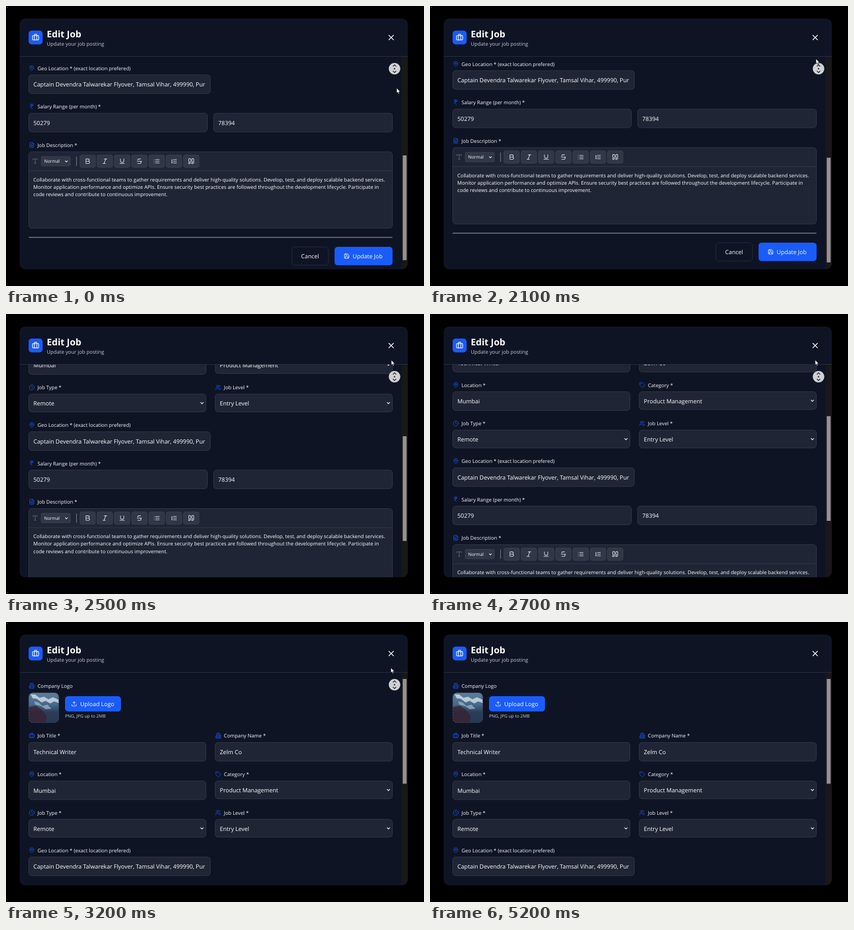
These frames come from a looping animation (800x536 px, 5300 ms). An HTML page:

```html
<!DOCTYPE html>
<html lang="en">
<head>
<meta charset="utf-8">
<title>Edit Job</title>
<style>
  html, body { margin: 0; width: 100%; height: 100%; overflow: hidden; background: #000; }
  svg { display: block; }
  text {
    font-family: "Open Sans", "Noto Sans", sans-serif; font-size: 11.05px;
    fill: #fff; white-space: pre; text-rendering: geometricPrecision;
  }
  .small { font-size: 9.64px; }
  .label { font-size: 9.64px; fill: #f8f9fb; }
  .title { font-size: 17.5px; font-weight: 700; }
  .sub { font-size: 9.75px; fill: #c6cad2; }
  .hint { font-size: 8.4px; fill: #ced2da; }
  .size { font-size: 8.5px; }
  .field { fill: #202536; stroke: #3a404f; stroke-width: .8; }
  .tool { fill: #313747; stroke: #434958; stroke-width: .7; }
  .blue { fill: #1a5cfa; }
  .line { fill: none; stroke-width: 2; stroke-linecap: round; stroke-linejoin: round; }
</style>
</head>
<body>
<svg width="800" height="536" viewBox="0 0 800 536">
  <defs>
    <symbol id="briefcase" viewBox="0 0 24 24"><path d="M16 20V4a2 2 0 0 0-2-2h-4a2 2 0 0 0-2 2v16"/><rect x="2" y="6" width="20" height="14" rx="2"/></symbol>
    <symbol id="building" viewBox="0 0 24 24"><path d="M6 22V4a2 2 0 0 1 2-2h8a2 2 0 0 1 2 2v18ZM6 12H4a2 2 0 0 0-2 2v6a2 2 0 0 0 2 2h2M18 9h2a2 2 0 0 1 2 2v9a2 2 0 0 1-2 2h-2M10 6h4M10 10h4M10 14h4M10 18h4"/></symbol>
    <symbol id="pin" viewBox="0 0 24 24"><path d="M20 10c0 5-5.5 10.2-7.4 11.8a1 1 0 0 1-1.2 0C9.5 20.2 4 15 4 10a8 8 0 0 1 16 0"/><circle cx="12" cy="10" r="3"/></symbol>
    <symbol id="tag" viewBox="0 0 24 24"><path d="M12.6 2.6A2 2 0 0 0 11.2 2H4a2 2 0 0 0-2 2v7.2a2 2 0 0 0 .6 1.4l8.7 8.7a2.4 2.4 0 0 0 3.4 0l6.6-6.6a2.4 2.4 0 0 0 0-3.4z"/><circle cx="7.5" cy="7.5" r=".5"/></symbol>
    <symbol id="clock" viewBox="0 0 24 24"><circle cx="12" cy="12" r="10"/><path d="M12 6v6l4 2"/></symbol>
    <symbol id="users" viewBox="0 0 24 24"><path d="M16 21v-2a4 4 0 0 0-4-4H6a4 4 0 0 0-4 4v2M22 21v-2a4 4 0 0 0-3-3.87M16 3.13a4 4 0 0 1 0 7.75"/><circle cx="9" cy="7" r="4"/></symbol>
    <symbol id="rupee" viewBox="0 0 24 24"><path d="M6 3h12M6 8h12M6 13l8.5 8M6 13h3c6.67 0 6.67-10 0-10"/></symbol>
    <symbol id="file" viewBox="0 0 24 24"><path d="M15 2H6a2 2 0 0 0-2 2v16a2 2 0 0 0 2 2h12a2 2 0 0 0 2-2V7ZM14 2v4a2 2 0 0 0 2 2h4M10 9H8M16 13H8M16 17H8"/></symbol>
    <symbol id="upload" viewBox="0 0 24 24"><path d="M21 15v4a2 2 0 0 1-2 2H5a2 2 0 0 1-2-2v-4M17 8l-5-5-5 5M12 3v12"/></symbol>
    <symbol id="save" viewBox="0 0 24 24"><path d="M15.2 3a2 2 0 0 1 1.4.6l3.8 3.8a2 2 0 0 1 .6 1.4V19a2 2 0 0 1-2 2H5a2 2 0 0 1-2-2V5a2 2 0 0 1 2-2zM17 21v-7a1 1 0 0 0-1-1H8a1 1 0 0 0-1 1v7M7 3v4a1 1 0 0 0 1 1h7"/></symbol>
    <symbol id="type" viewBox="0 0 24 24"><path d="M4 7V4h16v3M9 20h6M12 4v16"/></symbol>
    <symbol id="bold" viewBox="0 0 24 24"><path d="M6 12h9a4 4 0 0 1 0 8H7a1 1 0 0 1-1-1V5a1 1 0 0 1 1-1h7a4 4 0 0 1 0 8"/></symbol>
    <symbol id="italic" viewBox="0 0 24 24"><path d="M19 4h-9M14 20H5M15 4L9 20"/></symbol>
    <symbol id="underline" viewBox="0 0 24 24"><path d="M6 4v6a6 6 0 0 0 12 0V4M4 20h16"/></symbol>
    <symbol id="strike" viewBox="0 0 24 24"><path d="M16 4H9a3 3 0 0 0-2.83 4M14 12a4 4 0 0 1 0 8H6M4 12h16"/></symbol>
    <symbol id="bullets" viewBox="0 0 24 24"><path d="M3 12h.01M3 18h.01M3 6h.01M8 12h13M8 18h13M8 6h13"/></symbol>
    <symbol id="numbers" viewBox="0 0 24 24"><path d="M10 12h11M10 18h11M10 6h11M4 10h2M4 6h1v4M6 18H4c0-1 2-2 2-3s-1-1.5-2-1"/></symbol>
    <symbol id="quote" viewBox="0 0 24 24"><path id="mark" d="M16 3a2 2 0 0 0-2 2v6a2 2 0 0 0 2 2 1 1 0 0 1 1 1v1a2 2 0 0 1-2 2 1 1 0 0 0-1 1v2a1 1 0 0 0 1 1 6 6 0 0 0 6-6V5a2 2 0 0 0-2-2z"/><use href="#mark" x="-11"/></symbol>
    <linearGradient id="sky" x2="0" y2="1">
      <stop offset="0" stop-color="#5f7f9a"/><stop offset=".4" stop-color="#47698a"/>
      <stop offset=".65" stop-color="#2c3c58"/><stop offset="1" stop-color="#263a52"/>
    </linearGradient>
    <clipPath id="card"><rect x="26" y="24" width="743" height="480" rx="11.4"/></clipPath>
    <clipPath id="body"><rect x="26" y="97" width="731" height="407"/></clipPath>
    <clipPath id="photo"><rect x="43.5" y="135.5" width="57.5" height="57" rx="8"/></clipPath>
    <clipPath id="geo"><rect x="52" y="449" width="330" height="37"/></clipPath>
  </defs>

  <g clip-path="url(#card)">
    <rect x="26" y="24" width="743" height="480" fill="#0f1425"/>
    <g clip-path="url(#body)"><g id="form"></g></g>
    <rect x="757" y="97" width="12" height="407" fill="#181818"/>
    <rect id="thumb" x="759.3" y="109" width="7.4" height="200.5" fill="#969294"/>
    <rect x="26" y="96" width="743" height="1" fill="#2b3140"/>
  </g>

  <rect class="blue" x="43.3" y="47" width="26.7" height="26.5" rx="5.7"/>
  <use class="line" href="#briefcase" x="49.5" y="53" width="14.3" height="14.3" stroke="#fff"/>
  <text class="title" x="78" y="60">Edit Job</text>
  <text class="sub" x="78" y="75.9">Update your job posting</text>
  <path d="M732.8 56l8.8 8.8m0-8.8l-8.8 8.8" fill="none" stroke="#fff" stroke-width="1.5" stroke-linecap="round"/>

  <g id="scroller">
    <circle cx="743.6" cy="120" r="11" fill="#d0d0d4"/>
    <path d="M740.4 115.8l3.2-3.2 3.2 3.2m-6.4 8.4l3.2 3.2 3.2-3.2" fill="none" stroke="#33353c" stroke-width="1.6"/>
    <circle cx="743.6" cy="120" r="1.5" fill="#33353c"/>
  </g>
  <path id="cursor" d="M0 0v9.8l2.2-2 1.5 3.5 1.7-.7-1.5-3.4h3z" fill="#fff" stroke="#000" stroke-width=".7"/>
</svg>
<script>
const $ = id => document.getElementById(id);

const icon = (name, x, y, size, color) =>
  `<use class="line" href="#${name}" x="${x - size / 2}" y="${y - size / 2}" width="${size}" height="${size}" stroke="${color}"/>`;
const text = (s, x, y, cls = '') => `<text class="${cls}" x="${x}" y="${y}">${s}</text>`;
const rect = (cls, x, y, w, h, r = 5.7) =>
  `<rect class="${cls}" x="${x}" y="${y}" width="${w}" height="${h}" rx="${r}"/>`;
const chevron = (x, y, r = 2.8) =>
  `<path d="M${x - r} ${y - r / 2}l${r} ${r} ${r} ${-r}" fill="none" stroke="#eceef2" stroke-width="1.3"/>`;
const label = (name, s, x, y) => icon(name, x + 5.8, y, 11.4, '#1a58ee') + text(s, x + 16.8, y + 3.8, 'label');
const input = (s, x, y, w) => rect('field', x, y, w, 35.8) + text(s, x + 9, y + 22.6);
const select = (s, x, y, w) =>
  rect('field', x, y, w, 34.2) + text(s, x + 9, y + 21.9) + chevron(x + w - 7.6, y + 17.2);

const left = 43.5, right = 400.3, half = 339.2;
const tools = ['bold', 'italic', 'underline', 'strike', 'bullets', 'numbers', 'quote'];
const lines = [
  'Collaborate with cross-functional teams to gather requirements and deliver high-quality solutions. Develop, test, and deploy scalable backend services.',
  'Monitor application performance and optimize APIs. Ensure security best practices are followed throughout the development lifecycle. Participate in',
  'code reviews and contribute to continuous improvement.'
];

const photo = `<g clip-path="url(#photo)">
  <rect x="43" y="135" width="59" height="58" fill="url(#sky)"/>
  <path d="M43 163l14-3 12 8 9 13-3 12H43z" fill="#38202f" opacity=".75"/>
  <path d="M47 138l9 1 8 6 9-2 8 5 9-4 11 5v6l-9-3-7 4-9-5-8 3-9-7-8-1z" fill="#dbe6ee" opacity=".75"/>
  <path d="M54 152l8 2 8 7 9-3 8 8-11 1-9-6-11-3z" fill="#b4c9d9" opacity=".6"/>
</g><rect x="43.7" y="135.7" width="57.2" height="56.8" rx="8" fill="none" stroke="#465063" stroke-dasharray="3 2"/>`;

$('form').innerHTML = [
  label('building', 'Company Logo', left, 122),
  photo,
  rect('blue', 113, 142, 107, 29.2),
  icon('upload', 130.3, 156.6, 11.4, '#fff'),
  text('Upload Logo', 142, 161.2),
  text('PNG, JPG up to 2MB', 113, 183.2, 'hint'),

  label('briefcase', 'Job Title *', left, 217.5),
  input('Technical Writer', left, 230.6, half),
  label('building', 'Company Name *', right, 217.5),
  input('Zelm Co', right, 230.6, half),

  label('pin', 'Location *', left, 291.4),
  input('Mumbai', left, 304.2, half),
  label('tag', 'Category *', right, 291.4),
  select('Product Management', right, 304.2, half),

  label('clock', 'Job Type *', left, 365),
  select('Remote', left, 377.7, half),
  label('users', 'Job Level *', right, 365),
  select('Entry Level', right, 377.7, half),

  label('pin', 'Geo Location * (exact location prefered)', left, 437),
  rect('field', left, 449.8, 347.6, 35.8),
  `<g clip-path="url(#geo)">${text('Captain Devendra Talwarekar Flyover, Tamsal Vihar, 499990, Pur', left + 9, 472.4)}</g>`,

  label('rupee', 'Salary Range (per month) *', left, 510.4),
  input('50279', left, 523.2, 342),
  input('78394', 397.3, 523.2, 342.2),

  label('file', 'Job Description *', left, 584),
  rect('field', left, 597, 696, 146.3),
  '<path d="M43.5 633.5h696" stroke="#3a404f" stroke-width=".8"/>',
  icon('type', 55.8, 615, 12.9, '#636a78'),
  rect('tool', 67.4, 606, 55.8, 18.3, 2.5),
  text('Normal', 73, 618.4, 'size'),
  chevron(115.6, 615.3, 2.4),
  '<path d="M135 606.5v17.5" stroke="#8b909b"/>',
  ...tools.map((name, i) => {
    const x = 141.3 + 33.05 * i;
    return rect('tool', x, 603.3, 29.8, 23.8, 4) + icon(name, x + 14.9, 615.2, 12.9, '#e2e4e9');
  }),
  ...lines.map((s, i) => text(s, 52.3, 653.5 + 14.3 * i, 'small')),

  '<path d="M43.5 760.9h696" stroke="#d3d6db" stroke-width=".9"/>',
  '<rect x="547" y="779.2" width="70" height="35" rx="5.7" fill="none" stroke="#2b3141" stroke-width=".9"/>',
  text('Cancel', 564.8, 801.3),
  rect('blue', 628.8, 779, 111, 35.2),
  icon('save', 652, 796.6, 11.4, '#fff'),
  text('Update Job', 663.6, 801.3)
].join('');

// Each key: time, then values.
const scrollKeys = [
  [0, 318], [100, 328], [2000, 328], [2100, 326], [2200, 310], [2300, 286],
  [2400, 258], [2500, 224.5], [2700, 155.5], [3150, 0], [5300, 0]
];
const cursorKeys = [
  [0, 747.7, 157], [700, 747.7, 157], [1000, 744.6, 148], [2000, 739.6, 105], [2100, 738.7, 101],
  [2500, 737.3, 88], [3200, 736.6, 87.5], [3800, 736.6, 87.5], [4100, 712, 80],
  [4300, 656, 50], [4400, 625, 5], [4500, 600, -30], [5300, 600, -30]
];

function at(keys, t) {
  const i = Math.max(1, keys.findIndex(k => k[0] >= t));
  const a = keys[i - 1], b = keys[i];
  const p = (t - a[0]) / (b[0] - a[0]);
  return a.slice(1).map((v, j) => v + (b[j + 1] - v) * p);
}

const loop = 5300, tick = 100, start = performance.now();

function draw() {
  // The picture advances in whole ticks.
  const t = Math.floor((performance.now() - start) % loop / tick) * tick;
  const [y] = at(scrollKeys, t);
  $('form').setAttribute('transform', `translate(0 ${-y})`);
  $('thumb').setAttribute('y', 109 + y * 0.5565);
  $('cursor').setAttribute('transform', `translate(${at(cursorKeys, t)})`);
  $('scroller').style.display = t < 3900 ? '' : 'none';
  requestAnimationFrame(draw);
}
draw();
</script>
</body>
</html>
```
